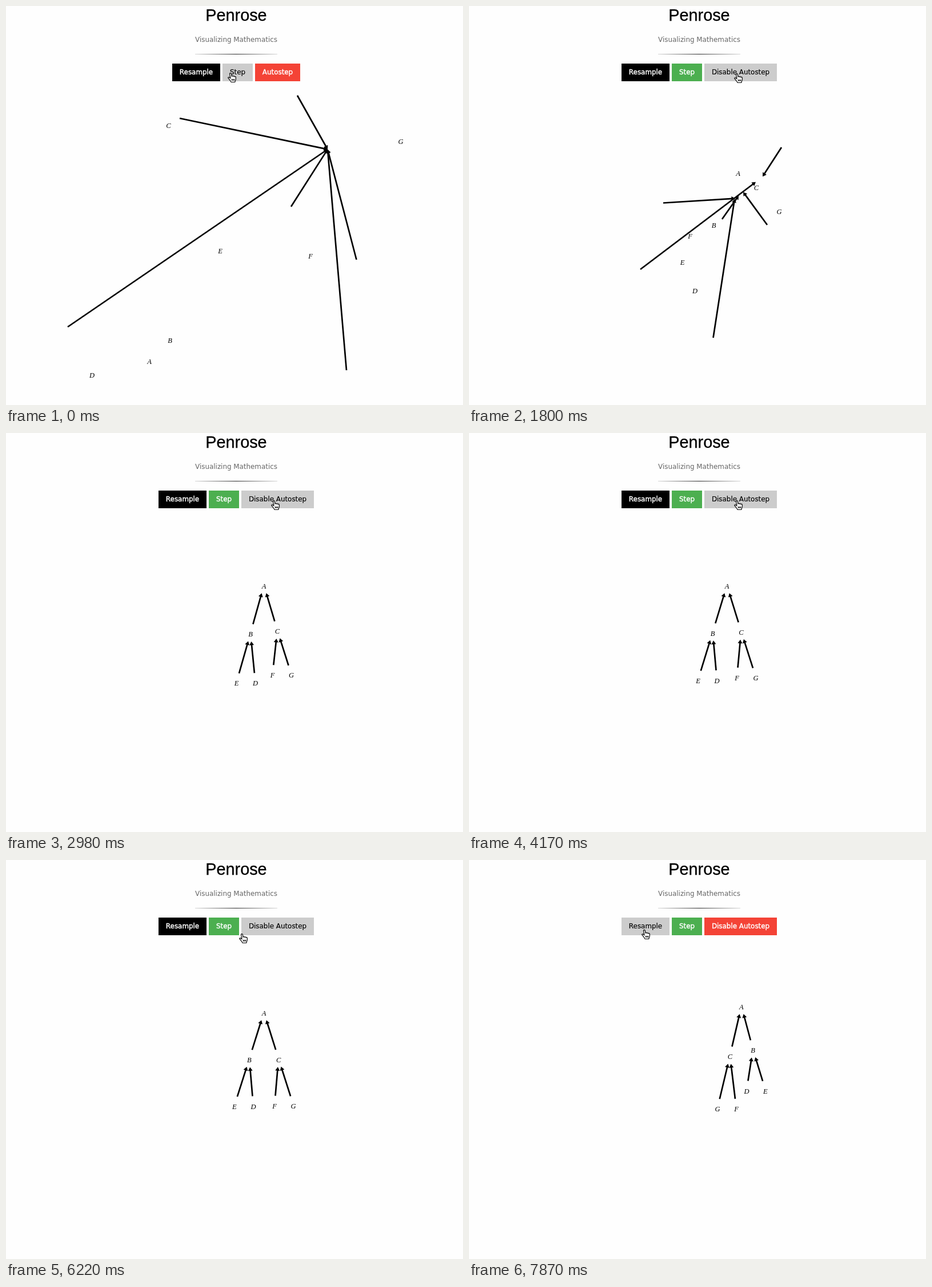
Animation, 800 px wide and 700 px high, one loop 8 s. Source, as an HTML page with a canvas:

```html
<!DOCTYPE html>
<html lang="en">
<head>
<meta charset="utf-8">
<title>Penrose</title>
<style>
html, body { margin: 0; width: 100%; height: 100%; overflow: hidden; background: #fefefe; }
canvas { display: block; }
</style>
</head>
<body>
<canvas id="stage" width="800" height="700"></canvas>
<script>
const ctx = document.getElementById('stage').getContext('2d');
const SANS = '"DejaVu Sans", sans-serif';
const NAMES = [...'ABCDEFG'];
const LINKS = ['BA', 'CA', 'EB', 'DB', 'FC', 'GC'];
const STEP = 147.5;

// A layout holds label centres by name and arrows as [tail, tip] in LINKS order.
const lerp = (a, b, p) => a.map((v, i) => v + (b[i] - v) * p);

function mix(a, b, p, q = p) {
  const labels = {};
  for (const n of NAMES) labels[n] = lerp(a.labels[n], b.labels[n], p);
  const arrows = a.arrows.map((ends, i) => ends.map((end, j) => lerp(end, b.arrows[i][j], q)));
  return { labels, arrows };
}

// Arrow on the line between two labels, with a gap at each end.
function link([x, y], [px, py]) {
  const len = Math.hypot(px - x, py - y);
  const ux = (px - x) / len, uy = (py - y) / len;
  return [[x + 16.4 * ux, y - 2 + 16.4 * uy], [px - 14.6 * ux, py - 2 - 14.6 * uy]];
}

// Binary tree; order names root, two children, then leaves from left to right.
// Tilt makes the left branch longer and the right one shorter.
function tree(order, x, y, spread, lean, tilt) {
  const labels = { [order[0]]: [x, y] };
  [-1, 1].forEach((side, i) => {
    const cx = x + side * spread, cy = y + 81.7 - side * tilt;
    labels[order[1 + i]] = [cx, cy];
    [-1, 1].forEach((s, j) => {
      labels[order[3 + 2 * i + j]] = [cx + side * lean + s * 16.5, cy + 81.7 - side * tilt * 1.8];
    });
  });
  return { labels, arrows: LINKS.map(([child, parent]) => link(labels[child], labels[parent])) };
}

const rough = tree('ABCEDFG', 454.5, 271.5, 21.5, 5, 6.5);
const tidy = tree('ABCEDFG', 451.5, 269, 23.5, 8, 2.5);
const balanced = tree('ABCEDFG', 451.5, 269, 25.7, 9.6, 0);
const second = tree('ACBGFDE', 477.2, 258, 19.5, 5, 5.6);
const secondWide = tree('ACBGFDE', 450, 262, 80, 40, 10);

// Random first sample: arrows share one tip, then the tips spread along a diagonal.
const scattered = {
  labels: { A: [251, 624], B: [287, 587], C: [284.5, 210], D: [150.5, 648],
    E: [375, 430], F: [533, 439], G: [691, 237.5] },
  arrows: [[499, 352], [510, 157], [108, 563], [596, 639], [304, 197], [613.5, 445]]
    .map(tail => [tail, [563, 251.5]])
};
const gathered = {
  labels: { A: [471, 293.5], B: [428.5, 385], C: [503, 318.5], D: [395.5, 500],
    E: [373.5, 449.5], F: [387, 403.5], G: [543, 361] },
  arrows: [[443, 374, -11], [547, 248, 31], [300, 462, 19], [427.5, 582, -18],
    [340, 345.5, -17], [522, 384, -3]]
    .map(([x, y, s]) => [[x, y], [483 + s, 324 - .8 * s]])
};

const settle = n => 1 - .4 ** n;

function pose(t, k) {
  if (k < 0) {
    const p = [300, 600, 750, 1050].filter(at => t >= at).length / 4;
    return mix(scattered, gathered, 1 - (1 - p) ** 2, p);
  }
  if (t >= 7120) return mix(secondWide, second, settle(Math.floor((t - 7120) / 150)));
  if (k < 3) return mix(gathered, rough, settle(k));
  if (k < 8) return mix(rough, tidy, 1 - ((8 - k) / 5) ** 2);
  return mix(tidy, balanced, 1 - Math.exp((8 - k) / 7.5));
}

function pointer(t, k) {
  if (t < 1200) return [388, 117];
  if (t < 1350) return [412, 118];
  if (k < 29) return [464, 118];
  if (k < 31) return lerp([464, 118], [408, 129], (k - 28) / 2);
  return k < 32 ? [309, 133] : [302, 122];
}

function text(str, x, y, font, color, weight = 0) {
  ctx.font = font;
  ctx.fillStyle = ctx.strokeStyle = color;
  ctx.fillText(str, x, y);
  if (weight) {
    ctx.lineWidth = weight;
    ctx.strokeText(str, x, y);
  }
}

function header() {
  text('Penrose', 403, 26, '28.8px "Liberation Sans", sans-serif', '#000', .3);
  text('Visualizing Mathematics', 403, 63, '11.9px ' + SANS, '#666');
  const fade = ctx.createLinearGradient(331, 0, 475, 0);
  fade.addColorStop(0, 'rgba(0,0,0,.15)');
  fade.addColorStop(.5, 'rgba(0,0,0,.85)');
  fade.addColorStop(1, 'rgba(0,0,0,.15)');
  ctx.fillStyle = fade;
  ctx.fillRect(331, 84, 144, 1);
}

function buttons(auto, hover) {
  let x = auto ? 267 : 291;
  const items = [
    ['Resample', 84, '#000'],
    ['Step', 53, '#4caf50'],
    [auto ? 'Disable Autostep' : 'Autostep', auto ? 127 : 79, '#f44336']];
  items.forEach(([label, width, color], i) => {
    const lit = i === hover;
    ctx.fillStyle = lit ? '#ccc' : color;
    ctx.fillRect(x, 101, width, 31);
    text(label, x + width / 2, 120, '11.9px ' + SANS, lit ? '#000' : '#fff', lit ? .15 : .4);
    x += width + 4;
  });
}

function arrow([[x, y], [tx, ty]]) {
  const len = Math.hypot(tx - x, ty - y);
  ctx.save();
  ctx.translate(tx, ty);
  ctx.rotate(Math.atan2(ty - y, tx - x));
  ctx.fillStyle = '#000';
  ctx.fillRect(-len, -1.35, len - 4, 2.7);
  ctx.beginPath();
  ctx.moveTo(0, 0);
  ctx.lineTo(-6.5, -4);
  ctx.lineTo(-6.5, 4);
  ctx.fill();
  ctx.restore();
}

const HAND = new Path2D('M3.5 1.6C4 .3 6 .3 6.3 1.8L7 6C7.5 4.9 9.3 5 9.5 6.3C10 5.4 11.8 5.6 12 6.9' +
  'C12.6 6.2 14.2 6.6 14.3 8V11C14.2 13 13 14 12.8 16.5H6C5.5 14 2.5 11.5 .9 9.2C.4 8 2 7.4 3 8.3L4.8 9.7Z');
const FINGERS = new Path2D('M7.5 11v3M9.5 11v3M11.5 11v3');

function hand([x, y]) {
  ctx.save();
  ctx.translate(x, y);
  ctx.lineWidth = 1.2;
  ctx.strokeStyle = '#000';
  ctx.fillStyle = '#fff';
  ctx.fill(HAND);
  ctx.stroke(HAND);
  ctx.stroke(FINGERS);
  ctx.restore();
}

function draw() {
  const t = performance.now() % 8000;
  // Autostep tick, -1 before it is switched on.
  const k = t < 1800 ? -1 : Math.min(33, Math.floor((t - 1794) / STEP));
  ctx.fillStyle = '#fefefe';
  ctx.fillRect(0, 0, 800, 700);
  ctx.textAlign = 'center';
  header();
  buttons(k >= 0, t < 1350 ? 1 : k < 31 ? 2 : k > 31 ? 0 : -1);

  const { labels, arrows } = pose(t, k);
  arrows.forEach(arrow);
  for (const n of NAMES) {
    const [x, y] = labels[n];
    text(n, x, y + 4, 'italic 12.5px "Liberation Serif", serif', '#000');
  }
  hand(pointer(t, k));
  requestAnimationFrame(draw);
}
draw();
</script>
</body>
</html>
```
